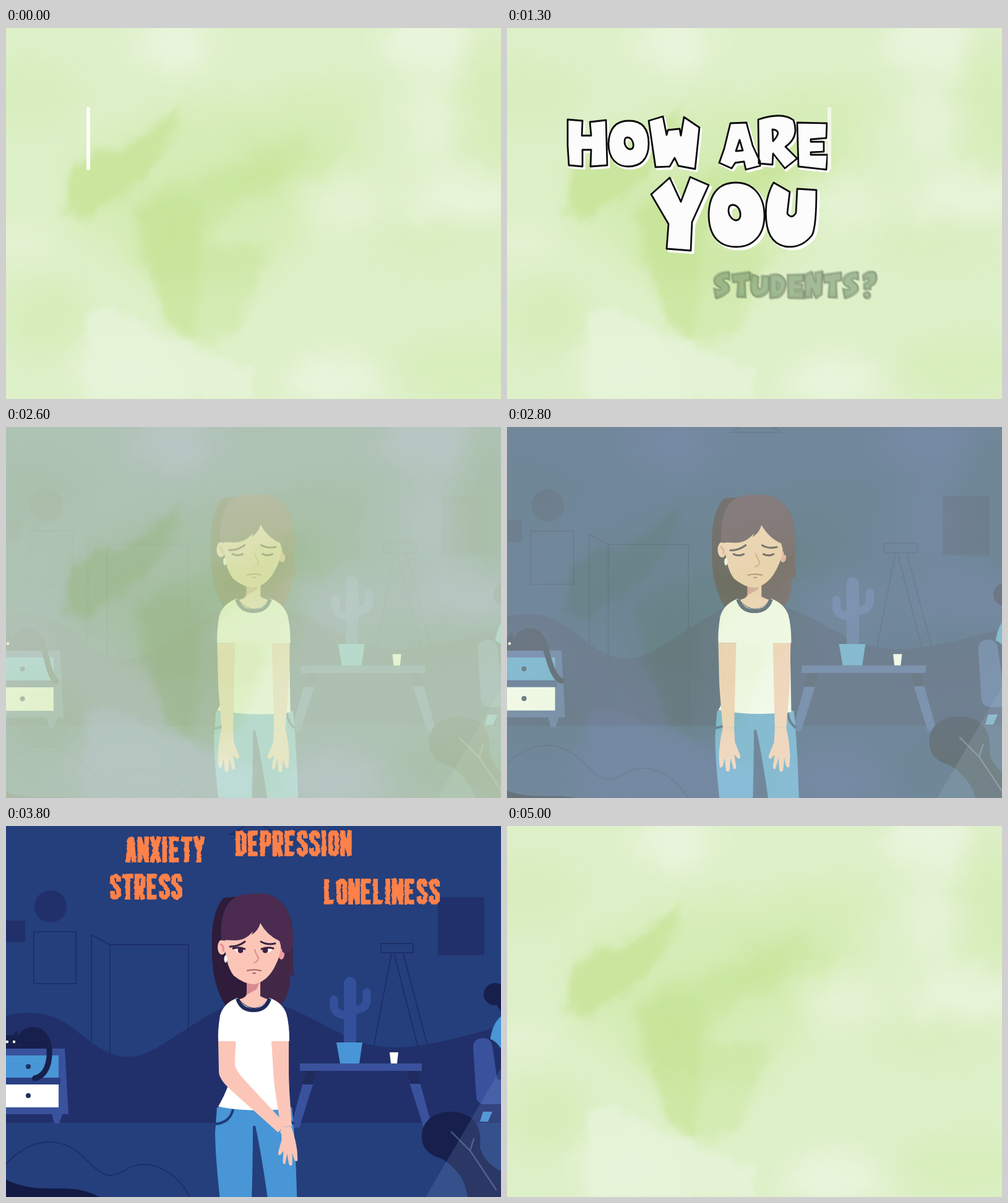
An HTML page for the animation above (5.6 s loop, 800x600 px).

```html
<!DOCTYPE html>
<html lang="en">
<head>
<meta charset="utf-8">
<title>How are you students?</title>
<style>
html, body { margin: 0; width: 100%; height: 100%; overflow: hidden; background: #def0c8; }
svg { position: absolute; left: 0; top: 0; width: 800px; height: 600px; overflow: hidden; }
.line { fill: none; stroke: #1d2f68; stroke-width: 2; }
.dark { fill: #21306b; }
.wood { fill: #3a529d; }
.blue { fill: #4896d6; }
.ink { fill: #17204c; }
.skin { fill: #fbc6b8; }
.feature { fill: none; stroke: #3a2142; stroke-width: 3; stroke-linecap: round; }
.comic { fill: #fcfcfc; fill-rule: evenodd; stroke: #0b0b0b; stroke-width: 2.8; stroke-linejoin: round; }
.halo { fill: #fff; stroke: #fff; stroke-width: 4; stroke-linejoin: round; }
.word { fill: none; stroke: #ff814a; stroke-width: 7.6; stroke-miterlimit: 3; }
</style>
</head>
<body>
<svg viewBox="0 0 800 600" aria-hidden="true">
  <defs>
    <filter id="wash" x="-20%" y="-20%" width="140%" height="140%" color-interpolation-filters="sRGB">
      <feGaussianBlur stdDeviation="24" result="b"/>
      <feTurbulence type="fractalNoise" baseFrequency=".016" numOctaves="4" seed="5"/>
      <feDisplacementMap in="b" scale="34" xChannelSelector="R" yChannelSelector="G"/>
      <feGaussianBlur stdDeviation="2"/>
    </filter>
    <filter id="edge" x="-20%" y="-20%" width="140%" height="140%" color-interpolation-filters="sRGB">
      <feGaussianBlur stdDeviation="7" result="b"/>
      <feTurbulence type="fractalNoise" baseFrequency=".03" numOctaves="4" seed="9"/>
      <feDisplacementMap in="b" scale="24" xChannelSelector="R" yChannelSelector="G"/>
    </filter>
  </defs>
  <rect width="800" height="600" fill="#def0c8"/>
  <g filter="url(#wash)">
    <g fill="#e9f5dd">
      <ellipse cx="272" cy="26" rx="68" ry="42"/>
      <ellipse cx="682" cy="22" rx="72" ry="48"/>
      <ellipse cx="690" cy="150" rx="34" ry="70" opacity=".8"/>
      <ellipse cx="740" cy="274" rx="95" ry="38" opacity=".9"/>
      <ellipse cx="545" cy="285" rx="60" ry="42" opacity=".6"/>
      <ellipse cx="525" cy="572" rx="78" ry="42"/>
      <ellipse cx="25" cy="350" rx="55" ry="28" opacity=".6"/>
      <ellipse cx="200" cy="560" rx="95" ry="70" opacity=".6"/>
    </g>
    <g fill="#d6ecb7">
      <ellipse cx="780" cy="130" rx="50" ry="105" opacity=".8"/>
      <ellipse cx="745" cy="555" rx="105" ry="52" opacity=".75"/>
      <ellipse cx="65" cy="470" rx="62" ry="62" opacity=".8"/>
      <ellipse cx="40" cy="110" rx="75" ry="55" opacity=".6"/>
      <ellipse cx="690" cy="345" rx="110" ry="38" opacity=".4"/>
      <path d="M270 130L580 90L575 225L490 250L480 340L400 420L220 400L100 310L110 210Z"/>
    </g>
    <path d="M215 270L315 250L420 190L520 200L410 270L310 300L310 405L230 385Z" fill="#c7e599"/>
  </g>
  <g filter="url(#edge)">
    <path d="M108 220L215 180L290 125L245 215L200 262L135 310L95 300Z" fill="#c7e498" opacity=".8"/>
    <path d="M212 290L315 290L315 405L300 508L262 480L235 400Z" fill="#c8e49b" opacity=".85"/>
    <path d="M232 408L410 408L372 490L312 512L270 485Z" fill="#cde8a5" opacity=".6"/>
    <path d="M315 355H425L405 412H315Z" fill="#cbe7a2" opacity=".6"/>
    <path d="M128 458L178 452L250 500L320 524L400 550L400 600H130Z" fill="#e7f4da" opacity=".8"/>
  </g>
</svg>

<svg id="stage" viewBox="0 0 800 600">
  <defs>
    <filter id="rough" x="-5%" y="-10%" width="110%" height="120%" color-interpolation-filters="sRGB">
      <feTurbulence type="fractalNoise" baseFrequency=".16" numOctaves="2" seed="3"/>
      <feDisplacementMap in="SourceGraphic" scale="3.5" xChannelSelector="R" yChannelSelector="G"/>
    </filter>
    <pattern id="dots" width="3" height="3" patternUnits="userSpaceOnUse" patternTransform="rotate(40)">
      <circle cx="1.5" cy="1.5" r="1.05" fill="#24552c"/>
    </pattern>
    <clipPath id="typed"><rect id="typedBox" y="100" width="0" height="150"/></clipPath>
    <path id="how" d="M98 148L122 150L121 174L136 174L134 152L160 149L162 222L135 224L136 197L122 197L122 224L100 222L98 190Z
      M164 187C165 160 178 150 197 150S229 160 229 187S214 224 196 224S164 212 164 187ZM190 184C190 191 195 196 199 196S205 193 204 187S199 177 195 177S190 179 190 184Z
      M229 150L252 143L258 173L260 165L279 163L281 174L286 144L311 161L304 228L277 223L271 210L263 224L240 225Z"/>
    <path id="are" d="M361 154L387 153L397 190L409 216L409 223L386 229L383 216L369 218L363 227L343 218L351 195ZM376 181L381 198L370 199Z
      M406 148Q445 135 463 149Q473 176 450 192L469 211L449 227L430 203L429 221L407 219ZM429 164Q446 166 430 183Z
      M469 153L517 154L516 178L491 180L491 184L512 184L512 200L491 201L491 205L518 205L516 229L471 224Z"/>
    <path id="you" d="M233 269L263 242L281 281L296 241L326 254L299 314L297 360L258 357L261 317Z
      M326 301C327 265 345 250 370 250S415 268 416 301S398 354 371 354S326 338 326 301ZM358 295C358 304 365 311 370 311S378 307 377 299S370 286 365 286S358 289 358 295Z
      M431 250L457 265L453 300Q460 310 467 299L469 260L500 262Q500 322 493 335Q475 358 448 353Q414 345 419 285Q423 262 431 250Z"/>
    <path id="s" d="M287 379L288 401Q275 394 271 401Q272 405 280 409Q292 420 285 432Q270 447 251 451L246 424Q260 430 264 424Q262 420 254 417Q244 410 247 398Q255 380 287 379Z"/>
    <path id="t" d="M294 386L343 379L343 401L329 404L331 448L308 447L311 406L297 408Z"/>
    <g id="students">
      <use href="#s"/><use href="#t"/>
      <path d="M348 385L366 392L364 421Q369 427 374 420L375 390L394 391L394 428Q382 449 362 447Q343 443 345 412Z"/>
      <path fill-rule="evenodd" d="M397 388Q430 378 440 408Q440 435 420 448L397 451ZM416 406Q427 415 416 428Z"/>
      <path d="M444 387L488 386L487 404L466 407L466 411L484 411L484 427L465 428L465 432L488 430L488 451L446 450Z"/>
      <path d="M490 387L510 378L520 408L518 381L539 377L536 440L520 451L509 424L510 448L491 450Z"/>
      <use href="#t" x="246" y="1"/><use href="#s" x="347"/>
      <path d="M647 390Q660 374 680 380Q690 396 678 412L668 418L668 426L650 426L650 412Q664 405 663 398Q655 396 649 404Z"/>
      <circle cx="658" cy="442" r="9"/>
    </g>
    <clipPath id="low"><path d="M240 450L300 430L345 450L395 430L445 448L500 430L540 450L590 432L645 450L700 434V470H240Z"/></clipPath>
    <path id="hand" class="skin" d="M-9 -4Q-14 15 -15 40L-14 57Q-10 61 -8 53L-6 43L-4 63Q0 68 2 61L3 43L8 60Q12 63 12 56L9 38L15 44Q20 46 18 38L10 18L9 -4Z"/>
  </defs>

  <g id="scene" opacity="0">
    <rect width="800" height="600" fill="#243f7c"/>
    <g id="room">
      <path class="dark" d="M-40 320C20 295 70 295 110 328C160 368 190 392 250 355C310 318 350 283 395 283C460 283 500 318 560 345C630 372 690 355 840 312V480H-40Z"/>
      <g class="dark">
        <rect x="-6" y="153" width="37" height="35"/>
        <circle cx="72" cy="130" r="26"/>
        <rect x="698" y="115" width="75" height="94"/>
      </g>
      <g class="line">
        <path d="M45 171H113V255H45ZM168 480V192H295V480M168 192L138 176V348"/>
        <path d="M606 190H658V205H606ZM623 206L594 358M627 206L666 358M642 206L681 355"/>
        <path d="M400 -8L362 14H444L400 -8"/>
        <path d="M-30 590C20 500 85 492 130 540C160 572 172 570 200 552C240 536 280 565 298 602"/>
      </g>
      <path class="wood" d="M485 396H503L474 488H460ZM646 396H664L689 488H675Z"/>
      <path fill="#1f2b5c" d="M485 396H503L496 418H478ZM646 396H664L670 417H653Z"/>
      <rect class="wood" x="475" y="384" width="197" height="12"/>
      <g fill="none" stroke="#34509a" stroke-linecap="round">
        <path stroke-width="20" d="M556 254V350"/>
        <path stroke-width="13" d="M530 280V292Q532 305 552 307M583 269V282Q582 297 560 298"/>
      </g>
      <path class="blue" d="M534 350H576L571 384H540Z"/>
      <path fill="#fff" d="M620 366H634L632 384H622Z"/>
      <path class="blue" d="M782 350Q786 308 815 300H860V415H785Z"/>
      <path class="dark" d="M776 343Q795 345 806 372V418H786Z"/>
      <path class="wood" d="M755 358Q755 343 772 343Q784 344 786 356L794 410H860V450H772Q761 448 760 438Z"/>
      <path class="blue" d="M771 462H786L779 478H766Z"/>
    </g>

    <g id="dresser">
      <path class="wood" d="M-40 360H95L101 466H-40ZM74 466H91L86 481H78Z"/>
      <path fill="#2a3f84" d="M-40 407H88V418H-40Z"/>
      <path class="blue" d="M-16 371H85V407H-16Z"/>
      <path fill="#fff" d="M-16 418H85V455H-16Z"/>
      <g fill="#22305f"><circle cx="36" cy="389" r="4"/><circle cx="36" cy="436" r="4"/></g>
      <path class="ink" d="M-4 360V332L2 338H12L17 331L20 340Q27 325 44 325Q70 326 74 360Z"/>
      <path id="tail" fill="none" stroke="#17204c" stroke-width="9" stroke-linecap="round"/>
      <g fill="#fff"><circle cx="2" cy="349" r="2.2"/><circle cx="13" cy="349" r="2.2"/></g>
    </g>

    <g id="woman">
      <g id="hair">
        <path fill="#2f1c3a" d="M352 116Q330 140 333 200Q332 255 355 291L400 285V112Z"/>
        <path fill="#432747" d="M400 112Q466 105 464 190Q463 225 466 243L459 240Q460 270 446 288L400 285Z"/>
      </g>
      <path class="skin" d="M389 236H411V275Q420 280 424 280Q402 308 376 280Q389 278 389 270Z"/>
      <path fill="#d98a92" d="M389 250H411L405 264L389 273Z"/>
      <path class="blue" d="M341 455H462Q469 520 471 640H428Q415 540 403 485H399Q399 550 396 640H350Q338 540 338 495Z"/>
      <path fill="none" stroke="#203a7a" stroke-width="4" d="M338 482Q362 480 367 458M452 458Q455 476 466 482"/>
      <path fill="#fff" d="M374 278Q352 286 346 306Q342 330 343 348H371L368 390Q362 420 343 454Q400 464 458 457L456 348H458Q458 320 453 303Q446 285 426 278Q400 312 374 278Z"/>
      <path fill="none" stroke="#1f2a5c" stroke-width="6" d="M374 279Q380 298 400 298Q420 298 426 279"/>
      <path id="armR" class="skin"/><use id="handR" href="#hand"/>
      <use id="handL" href="#hand"/><path id="armL" class="skin"/>
      <g id="head">
        <ellipse fill="#ef9da3" cx="445" cy="207" rx="5" ry="9"/>
        <path class="skin" d="M353 170Q352 222 368 242Q385 256 402 256Q425 250 437 222Q446 205 446 170L400 140Z"/>
        <ellipse class="skin" cx="349" cy="196" rx="7" ry="12"/>
        <path fill="none" stroke="#e58f95" stroke-width="3" d="M346 191Q353 194 351 203"/>
        <ellipse fill="#fff" cx="355" cy="215" rx="2.5" ry="6"/>
        <path fill="#4b2c50" d="M348 185C345 135 360 107 400 110C442 103 463 135 464 190Q460 212 447 204L442 186Q422 177 411 157Q408 169 397 176L399 170Q388 185 370 185Q358 184 348 185Z"/>
        <g id="face">
          <path class="feature" d="M362 195Q376 195 386 187M412 187Q422 193 435 190"/>
          <g id="open">
            <path fill="#fff" d="M369 199H386Q382 206 375 205ZM413 199H431Q426 206 418 205Z"/>
            <g fill="#3a2142"><circle cx="379" cy="201" r="4.5"/><circle cx="419" cy="201" r="4.5"/></g>
            <path class="feature" d="M367 198Q377 195 386 199M413 199Q423 195 432 198"/>
          </g>
          <path id="shut" class="feature" d="M367 201Q376 205 383 201M414 201Q422 205 430 201"/>
          <path class="feature" style="stroke:#dc8c86;stroke-width:2" d="M402 200Q404 208 408 213Q407 220 401 221"/>
          <path class="feature" style="stroke:#a85f68;stroke-width:2" d="M390 234Q400 231 412 234M399 238H403"/>
        </g>
      </g>
    </g>

    <g id="front">
      <path fill="#131a44" d="M-60 520C-25 570 20 585 60 586S125 582 165 608V660H-60Z"/>
      <path class="ink" d="M672 502C672 472 700 458 730 463C765 470 768 495 766 520Q775 550 810 562V660H750Q750 590 735 567Q715 540 695 535Q672 525 672 502Z"/>
      <path fill="none" stroke="#47537f" stroke-width="2.5" stroke-linecap="round" d="M720 495L750 525L792 588M750 525L756 506"/>
      <path fill="#8fa3d8" opacity=".17" d="M801 390L652 645H860V390Z"/>
      <g class="ink"><circle cx="790" cy="272" r="18"/><rect x="801" y="424" width="60" height="93"/></g>
      <path fill="none" stroke="#17204c" stroke-width="13" d="M860 232L790 272L822 324"/>
    </g>
    <g id="words"></g>
  </g>

  <g id="title" role="img" aria-label="How are you students?">
    <g clip-path="url(#typed)">
      <g class="halo" transform="translate(2.5 3)"><use href="#how"/><use href="#are"/></g>
      <g class="comic"><use href="#how"/><use href="#are"/></g>
    </g>
    <g id="youPop">
      <use class="halo" href="#you" transform="translate(3.5 3.5)"/>
      <use class="comic" href="#you"/>
    </g>
    <g id="studentsPop" stroke-linejoin="round">
      <use href="#students" fill="#0b0b0b" stroke="#0b0b0b" stroke-width="5" transform="translate(3 3)"/>
      <use href="#students" fill="#0b0b0b" stroke="#0b0b0b" stroke-width="5"/>
      <use href="#students" fill="#e4f3dc" stroke="#e4f3dc" stroke-width="1"/>
      <use href="#students" fill="#45a648" transform="translate(.8 .4)"/>
      <g clip-path="url(#low)"><use href="#students" fill="url(#dots)"/></g>
    </g>
  </g>
  <rect id="cursor" y="128" width="6" height="102" rx="2" fill="#fdfefb"/>
</svg>

<script>
const LOOP = 5600, STEP = 100;
const $ = id => document.getElementById(id);
const set = (id, name, value) => $(id).setAttribute(name, value);
const clamp = v => Math.max(0, Math.min(1, v));
const ramp = (t, a, b) => clamp((t - a) / (b - a));
const smooth = v => v * v * (3 - 2 * v);
const out = v => 1 - (1 - v) ** 3;
const mix = (a, b, k) => a + (b - a) * k;
const mixPoints = (p, q, k) => p.map((v, i) => v.map((n, j) => mix(n, q[i][j], k)));
const zoom = (x, y, s) => `translate(${x} ${y}) scale(${s}) translate(${-x} ${-y})`;

// Condensed capitals drawn as centre lines, 18 wide and 42 high
const bowl = 'M4 42V4H11L14 7V20L11 23H4';
const glyphs = {
  A: 'M4 42L7.5 4H10.5L14 42M6 29H12',
  D: 'M4 4H10L14 8V34L10 38H4Z',
  E: 'M16 4H4V38H16M4 21H14',
  I: 'M4 0V42',
  L: 'M4 0V38H16',
  N: 'M3.5 42V0M14.5 42V0M4 6L14 36',
  O: 'M7 4H11L14 7V35L11 38H7L4 35V7Z',
  P: bowl,
  R: bowl + 'M9 23L14 42',
  S: 'M14 13V7L11 4H7L4 7V14L14 26V35L11 38H7L4 35V28',
  T: 'M0 4H18M9 4V42',
  X: 'M3 0L15 42M15 0L3 42',
  Y: 'M3 0L9 23L15 0M9 20V42'
};
// x and y at 3800 ms, drift per second, time of appearance
const words = [
  { text: 'ANXIETY', x: 193, y: 17, dx: 2, dy: -8.7, at: 3200 },
  { text: 'DEPRESSION', x: 371, y: 7, dx: -12.5, dy: 5, at: 3300 },
  { text: 'STRESS', x: 168, y: 77, dx: 3, dy: -1.5, at: 3100 },
  { text: 'LONELINESS', x: 514, y: 85, dx: -38.5, dy: -15, at: 3400 }
];
for (const w of words) {
  let x = 0, inner = '';
  for (const c of w.text) {
    inner += `<path d="${glyphs[c]}" transform="translate(${x} 0)"/>`;
    x += c === 'I' ? 11 : 19.8;
  }
  $('words').insertAdjacentHTML('beforeend',
    `<g class="word" role="img" aria-label="${w.text}"><g filter="url(#rough)">${inner}</g></g>`);
  w.node = $('words').lastElementChild;
}

// Outline of a tapering limb through joints [x, y, half width]
function limb(joints) {
  const left = [], right = [];
  joints.forEach(([x, y, r], i) => {
    const a = joints[Math.max(0, i - 1)], b = joints[Math.min(joints.length - 1, i + 1)];
    const d = Math.hypot(b[0] - a[0], b[1] - a[1]);
    const nx = i ? -(b[1] - a[1]) / d * r : -r, ny = i ? (b[0] - a[0]) / d * r : 0;
    left.push([x + nx, y + ny]);
    right.unshift([x - nx, y - ny]);
  });
  const [l0, l1, l2] = left, [r2, r1, r0] = right;
  return `M${l0}L${mixPoints([l0], [l1], .8)[0]}Q${l1} ${mixPoints([l1], [l2], .2)[0]}L${l2}L${r2}` +
    `L${mixPoints([r2], [r1], .8)[0]}Q${r1} ${mixPoints([r1], [r0], .2)[0]}L${r0}Z`;
}
const arms = {
  L: { hang: [[357, 348, 14], [357, 415, 12.5], [359, 482, 9]], fold: [[357, 348, 14], [357, 402, 15], [446, 489, 9]] },
  R: { hang: [[443, 348, 14], [443, 415, 12.5], [441, 482, 9]], fold: [[443, 348, 14], [445, 415, 12], [453, 486, 9]] }
};

function drawTitle(t) {
  const x = t < 600 ? mix(133, 313, t / 600) : mix(313, 521, ramp(t, 600, 1200));
  set('cursor', 'x', x - 3);
  set('cursor', 'opacity', t <= 1200 ? 1 : t < 1400 ? .7 : 0);
  set('typedBox', 'width', t === 0 ? 0 : t >= 1200 ? 800 : x);
  const you = ramp(t, 700, 1200), st = ramp(t, 1200, 1700);
  set('youPop', 'transform', zoom(367, 301, mix(.5, 1, out(you))));
  set('youPop', 'opacity', clamp(you * 2));
  set('studentsPop', 'transform', zoom(465, 415, st <= .2 ? .6 : mix(.6, 1, out((st - .2) / .8))));
  // The layers fade one by one, so the shadow shows through the green
  for (const name of ['fill-opacity', 'stroke-opacity']) set('studentsPop', name, st ** 1.25);
  set('title', 'opacity', 1 - ramp(t, 2100, 2500));
  set('title', 'visibility', t < 2500 ? 'visible' : 'hidden');
}

function drawScene(t) {
  const shown = t < 4000 ? ramp(t, 2450, 3050) : 1 - ramp(t, 4600, 5000);
  set('scene', 'opacity', shown);
  set('scene', 'visibility', shown ? 'visible' : 'hidden');
  if (!shown) return;

  // Slow pull back; nearer layers shrink faster
  const u = (t - 3800) / 1000, s = 1 - .0249 * u - .0064 * u * u;
  const depth = { room: 1, dresser: 1.25, woman: 1.4, front: 2 };
  for (const id in depth) set(id, 'transform', zoom(400, 300, s ** depth[id]));

  const tip = 70 + 25 * Math.cos((t - 2800) / 1800 * 2 * Math.PI);
  set('tail', 'd', `M66 345C74 365 ${mix(76, tip, .15)} 402 ${tip} 408`);

  const k = smooth(ramp(t, 2900, 3600));
  for (const side of 'LR') {
    const arm = mixPoints(arms[side].hang, arms[side].fold, k), [x, y] = arm[2];
    set('arm' + side, 'd', limb(arm));
    const pose = side === 'L'
      ? `rotate(${-38 * k}) scale(${mix(1, .35, k)})`
      : `rotate(${-6 * k}) scale(${mix(-1, -.92, k)} ${mix(1, .92, k)})`;
    set('hand' + side, 'transform', `translate(${x} ${y + 4}) ${pose}`);
  }
  const low = 1 - k;
  set('head', 'transform', `translate(0 ${5 * low})`);
  set('hair', 'transform', `translate(0 ${4 * low})`);
  set('face', 'transform', `translate(0 ${2 * low})`);
  set('open', 'visibility', k > .4 ? 'inherit' : 'hidden');
  set('shut', 'visibility', k > .4 ? 'hidden' : 'inherit');

  for (const w of words) {
    const p = ramp(t, w.at - 100, w.at + 200);
    w.node.setAttribute('opacity', p);
    w.node.setAttribute('transform', `translate(${w.x + w.dx * u} ${w.y + w.dy * u})`);
  }
}

const start = performance.now();
function frame() {
  const t = Math.floor((performance.now() - start) % LOOP / STEP) * STEP;
  drawTitle(t);
  drawScene(t);
  requestAnimationFrame(frame);
}
frame();
</script>
</body>
</html>
```
